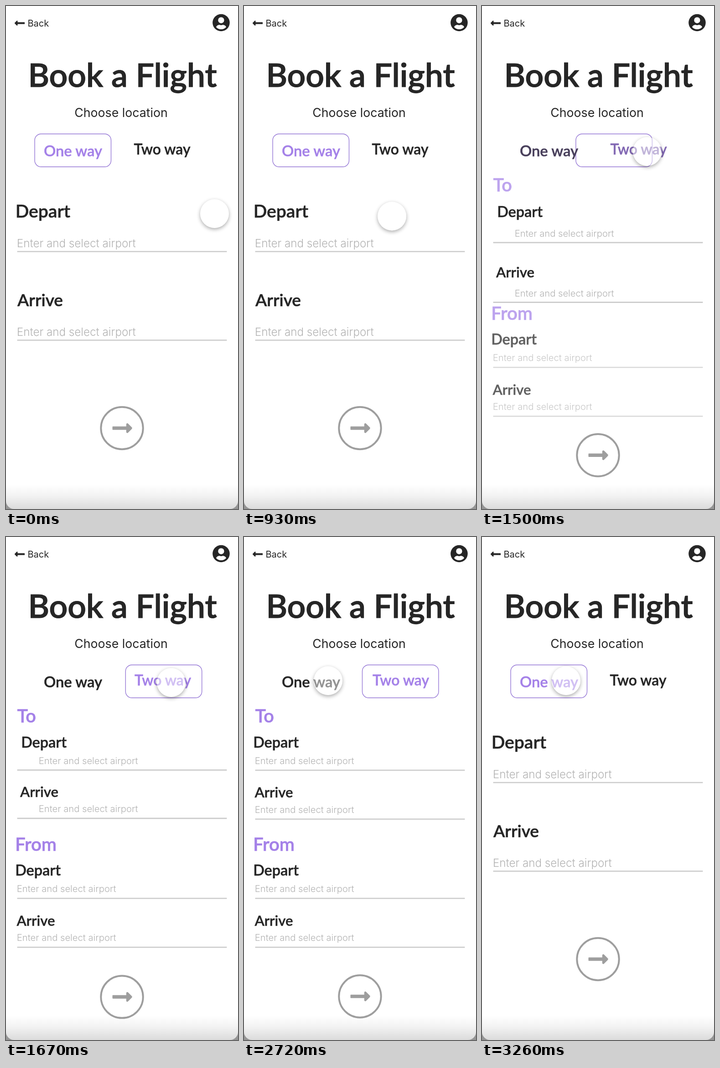
Animation of 509 by 1101 pixels, one loop 3.32 s. Source, as an HTML page:

```html
<!DOCTYPE html>
<html lang="en">
<head>
<meta charset="utf-8">
<title>Book a Flight</title>
<style>
  html, body { margin: 0; width: 100%; height: 100%; overflow: hidden; background: #959595; }
  #screen {
    position: absolute; left: 0; top: 0; width: 509px; height: 1101px; overflow: hidden;
    border-radius: 0 0 18px 18px; background: #fff;
  }
  #shade {
    position: absolute; left: 0; right: 0; bottom: 0; height: 54px;
    background: linear-gradient(#fff0, #0000000c 45%, #00000024);
  }
  #cursor {
    position: absolute; left: -31.5px; top: -31.5px; width: 63px; height: 63px;
    border-radius: 50%; background: #ffffff80; box-shadow: 0 3px 8px #00000055;
  }
  svg { position: absolute; left: 0; top: 0; }
  text { color: #262626; fill: currentColor; white-space: pre; }
  .head {
    font-family: Lato, "Open Sans", sans-serif; font-weight: 600;
    stroke: currentColor; stroke-width: .016em;
  }
  .body { font-family: Inter, "Noto Sans", sans-serif; font-weight: 400; }
  .hint { color: #b3b3b3; font-weight: 300; }
  .accent { color: #a481e8; }
  .mid { text-anchor: middle; }
  .rule { stroke: #cbcbcb; stroke-width: 2.6; }
</style>
</head>
<body>
<div id="screen">
  <svg id="art" width="509" height="1101" viewBox="0 0 509 1101">
    <defs>
      <path id="arrow" d="M12-40H314V-86C314-108 340-118 355-103L441-17Q455 0 441 17L355 103C340 118 314 108 314 86V40H12Q0 40 0 28V-28Q0-40 12-40Z"/>
    </defs>
    <use href="#arrow" fill="#262626" transform="translate(41 37.5) scale(-.0495 .0495)"/>
    <g transform="translate(472 36.5) scale(.0757)">
      <circle r="248" fill="#262626"/>
      <circle cy="-72" r="88" fill="#fff"/>
      <path fill="#fff" d="M-146 124Q-115 64-48 64Q0 80 48 64Q115 64 146 124Q92 192 0 192Q-92 192-146 124Z"/>
    </g>
    <rect id="tab" y="280" width="167.5" height="72" rx="14" fill="none" stroke="#9678d6" stroke-width="1.4"/>
    <g id="next" fill="#9e9e9e">
      <circle r="46.2" fill="none" stroke="#9e9e9e" stroke-width="4"/>
      <use href="#arrow" transform="translate(-21 0) scale(.0965)"/>
    </g>
    <g id="extra"></g>
  </svg>
  <div id="shade"></div>
  <div id="cursor"></div>
</div>
<script>
const LOOP = 3320;
const OPEN = [1400, 1830], CLOSE = [3030, 3260];
const DARK = [38, 38, 38], ACCENT = [164, 129, 232];
const HINT = 'Enter and select airport';

const $ = id => document.getElementById(id);
const art = $('art'), extra = $('extra');
const clamp = v => Math.min(1, Math.max(0, v));
const lerp = (a, b, p) => a + (b - a) * p;
const mix = (a, b, p) => `rgb(${a.map((v, i) => Math.round(lerp(v, b[i], clamp(p))))})`;

function add(parent, tag, attrs, content = '') {
  const el = document.createElementNS('http://www.w3.org/2000/svg', tag);
  for (const name in attrs) el.setAttribute(name, attrs[name]);
  el.textContent = content;
  parent.append(el);
  return el;
}
const label = (parent, content, x, y, size, cls) =>
  add(parent, 'text', { x, y, 'font-size': size, class: cls }, content);
const rule = (parent, y) =>
  add(parent, 'line', { x1: 24.5, x2: 484.5, y1: y, y2: y, class: 'rule' });

label(art, 'Back', 47.5, 45, 20, 'body');
label(art, 'Book a Flight', 255.5, 177, 71.4, 'head mid');
label(art, 'Choose location', 252.5, 243, 26.7, 'body mid');
const oneWay = label(art, 'One way', 147, 329, 32.7, 'head mid');
const twoWay = label(art, 'Two way', 342.5, 325, 31.9, 'head mid');

// Section that exists only for two-way trips
label(extra, 'To', 24.5, 406, 39.5, 'head accent');
label(extra, 'From', 20, 687, 40, 'head accent');
label(extra, 'Depart', 20.2, 741, 32.4, 'head');
label(extra, HINT, 23.8, 777, 20.2, 'body hint');
rule(extra, 791);
label(extra, 'Arrive', 23.4, 851, 31, 'head');
label(extra, HINT, 23.8, 884, 20.2, 'body hint');
rule(extra, 898);

// Texts of both layouts: [x, y, size]; shift applies while opening / closing
const fields = [
  { text: 'Depart', cls: 'head', one: [20.7, 463, 39], two: [20.2, 461, 32.4], shift: [13, -10] },
  { text: 'Arrive', cls: 'head', one: [25, 657, 36.9], two: [23.4, 570, 31], shift: [7.5, -8] },
  { text: HINT, cls: 'body hint', one: [23.8, 528, 24.2], two: [23.8, 497, 20.2], shift: [48, 4] },
  { text: HINT, cls: 'body hint', one: [23.8, 722, 24.2], two: [23.8, 604, 20.2], shift: [48, 4] },
];
for (const f of fields) f.el = label(art, f.text, ...f.one, f.cls);
const rules = [[537.5, 510.5], [731.5, 617.5]].map(([one, two]) => ({ one, two, el: rule(art, one) }));

// Lightly underdamped spring, about 1.6 % overshoot
function spring(ms) {
  const s = ms / 1000, damp = 17, freq = 13;
  return 1 - Math.exp(-damp * s) * (Math.cos(freq * s) + damp / freq * Math.sin(freq * s));
}
const within = (t, [from, to]) => t >= from && t < to;

function layoutAt(t) {
  if (within(t, OPEN)) return spring(t - OPEN[0]);
  if (within(t, CLOSE)) return 1 - spring(t - CLOSE[0]);
  return t >= OPEN[1] && t < CLOSE[0] ? 1 : 0;
}

// Cursor moves: time span, start, control and end points
const moves = [
  { span: [0, 470], points: [[457, 454], [390, 494], [324, 460]] },
  { span: [900, 1230], points: [[324, 460], [343, 388], [362, 318]] },
  { span: [2230, 2660], points: [[362, 318], [273, 334], [184, 314]] },
];
const ease = p => p < .5 ? 4 * p ** 3 : 1 - 4 * (1 - p) ** 3;

function cursorAt(t) {
  const { span: [from, to], points: [a, b, c] } = moves.findLast(m => t >= m.span[0]);
  const p = ease(clamp((t - from) / (to - from)));
  return [0, 1].map(i => lerp(lerp(a[i], b[i], p), lerp(b[i], c[i], p), p));
}

function draw(t) {
  const p = layoutAt(t);
  const opening = within(t, OPEN), closing = within(t, CLOSE);
  const isTwo = t >= OPEN[0] && t < CLOSE[0];

  $('tab').setAttribute('x', lerp(63, 259.5, p));
  $('next').setAttribute('transform', `translate(254.5 ${lerp(924, 1005.5, p)})`);
  extra.setAttribute('opacity', clamp(p));
  oneWay.style.color = mix(ACCENT, DARK, p);
  twoWay.style.color = mix(DARK, ACCENT, p);
  twoWay.setAttribute('x', lerp(342.5, 344, p));

  for (const { el, one, two, shift } of fields) {
    const [x, , size] = isTwo ? two : one;
    el.setAttribute('x', x + (opening ? shift[0] : closing ? shift[1] : 0));
    el.setAttribute('y', lerp(one[1], two[1], p));
    el.setAttribute('font-size', size);
  }
  for (const { el, one, two } of rules) {
    const y = lerp(one, two, p);
    el.setAttribute('y1', y);
    el.setAttribute('y2', y);
  }
  const [x, y] = cursorAt(t);
  $('cursor').style.transform = `translate(${x}px, ${y}px)`;
}

const start = performance.now();
function tick() {
  draw((performance.now() - start) % LOOP);
  requestAnimationFrame(tick);
}
tick();
</script>
</body>
</html>
```
